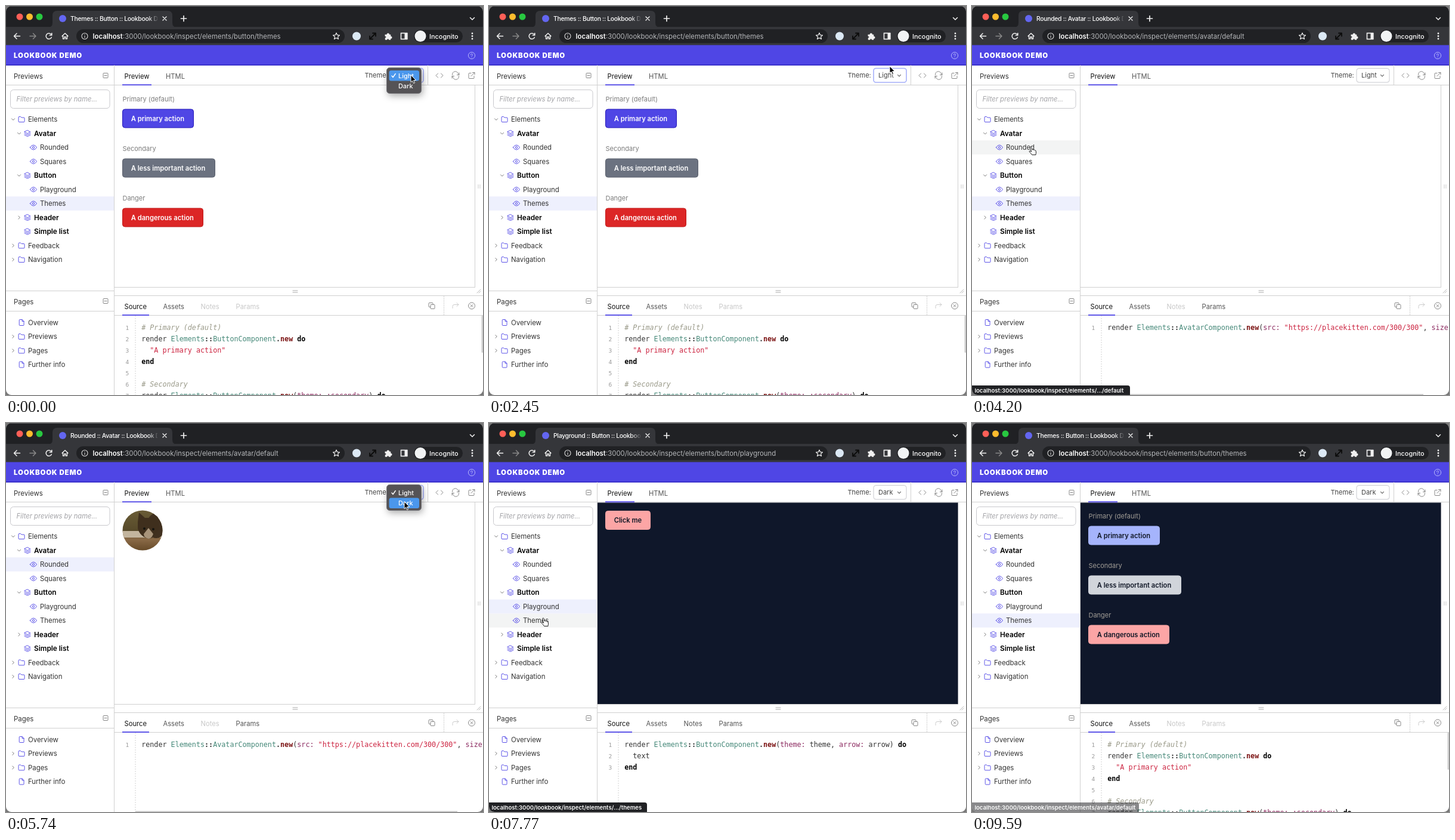
An HTML page that plays this animation: 800x652 px, repeating every 9.66 s.

```html
<!DOCTYPE html>
<html lang="en">
<head>
<meta charset="utf-8">
<title>Component preview browser</title>
<style>
html, body { margin: 0; width: 100%; height: 100%; overflow: hidden; background: #777; }
svg { display: block; width: 800px; height: 652px; }
text { font: 11.4px Inter, sans-serif; fill: #333; white-space: pre; }
.bold { font-weight: 600; font-size: 11.8px; fill: #000; }
.tab { font-size: 11.2px; fill: #555; }
.off { fill: #c8c8c8; }
.on { fill: #111; }
.small { font-size: 11px; fill: #444; }
.label { fill: #7c7c7c; font-size: 11px; }
.button { font-size: 11.2px; font-weight: 600; }
.chrome { font-weight: 500; font-size: 10.9px; fill: #fff; }
.title { font-size: 10.4px; letter-spacing: -.3px; }
.status { font-size: 9.6px; font-weight: 600; }
.code { font: 11.72px "DejaVu Sans Mono", monospace; fill: #333; }
.num { font-size: 9.5px; fill: #999; }
.comment { fill: #999988; font-style: italic; }
.string { fill: #cc2440; }
.const { fill: #458878; }
.key { fill: #8c2a60; }
.op { font-weight: bold; }
.method { fill: #7c1414; font-weight: bold; }
.word { fill: #000; font-weight: bold; }
</style>
</head>
<body>
<svg viewBox="0 0 800 652">
  <defs>
    <clipPath id="window"><rect width="800" height="652" rx="9"/></clipPath>
    <clipPath id="round"><circle cx="229" cy="180" r="33.5"/></clipPath>
    <linearGradient id="fade"><stop stop-color="#35363a" stop-opacity="0"/><stop offset="1" stop-color="#35363a"/></linearGradient>
    <linearGradient id="photo" x2="0" y2="1"><stop stop-color="#6a5c36"/><stop offset=".5" stop-color="#574a2a"/><stop offset=".72" stop-color="#8a6a47"/><stop offset="1" stop-color="#664a28"/></linearGradient>
    <filter id="shadow" x="-40%" y="-40%" width="180%" height="200%"><feDropShadow dy="4" stdDeviation="6" flood-opacity=".32"/></filter>
  </defs>
  <g clip-path="url(#window)"><g id="frame"></g><g id="page"></g><g id="status"></g><g id="cursor"></g></g>
</svg>
<script>
const INDIGO = '#4f46e5', LINE = '#d0d0d0', DARK = '#202124', LOOP = 9660;
const $ = id => document.getElementById(id);

const text = (x, y, s, cls = '', attrs = '') => `<text x="${x}" y="${y}" class="${cls}" ${attrs}>${s}</text>`;
const rect = (x, y, w, h, fill, rx = 0, stroke = 'none', width = 1) =>
  `<rect x="${x}" y="${y}" width="${w}" height="${h}" rx="${rx}" fill="${fill}" stroke="${stroke}" stroke-width="${width}"/>`;
const circle = (x, y, r, fill, stroke = 'none', width = 1) =>
  `<circle cx="${x}" cy="${y}" r="${r}" fill="${fill}" stroke="${stroke}" stroke-width="${width}"/>`;
const path = (x, y, d, stroke, width = 1, fill = 'none') =>
  `<path transform="translate(${x} ${y})" d="${d}" fill="${fill}" stroke="${stroke}" stroke-width="${width}" stroke-linecap="round" stroke-linejoin="round"/>`;
const line = (d, color = LINE, extra = '') => `<path d="${d}" fill="none" stroke="${color}" ${extra}/>`;

const ICONS = {
  folder: 'M-5 -3.5Q-5 -4.5 -4 -4.5H-1.5L0 -3H4Q5 -3 5 -2V3.5Q5 4.5 4 4.5H-4Q-5 4.5 -5 3.5Z',
  layers: 'M0 -5L5 -2.3 0 .2 -5 -2.3ZM-5 .2L0 2.7 5 .2M-5 2.6L0 5.1 5 2.6',
  eye: 'M-5.5 0Q-3 -4 0 -4T5.5 0Q3 4 0 4T-5.5 0ZM-1.7 0A1.7 1.7 0 1 0 1.7 0A1.7 1.7 0 1 0 -1.7 0',
  file: 'M-3.8 -4Q-3.8 -5 -2.8 -5H1L4 -2V4Q4 5 3 5H-2.8Q-3.8 5 -3.8 4ZM1 -5V-2H4'
};
const DOWN = 'M-2.5 -1.2L0 1.3 2.5 -1.2', RIGHT = 'M-1.2 -2.5L1.3 0 -1.2 2.5';

const treeItem = (y, x, icon, name, chevron, bold) =>
  (chevron ? path(x - 25, y, chevron, '#777') : '') +
  path(x - 11, y, ICONS[icon], '#5b52e8') + text(x, y + 4.2, name, bold ? 'bold' : '');

const TREE = [
  [37, 'folder', 'Elements', DOWN], [47, 'layers', 'Avatar', DOWN, 1],
  [57, 'eye', 'Rounded'], [57, 'eye', 'Squares'],
  [47, 'layers', 'Button', DOWN, 1], [57, 'eye', 'Playground'], [57, 'eye', 'Themes'],
  [47, 'layers', 'Header', RIGHT, 1], [47, 'layers', 'Simple list', '', 1],
  [37, 'folder', 'Feedback', RIGHT], [37, 'folder', 'Navigation', RIGHT]
];
const PAGES = [['file', 'Overview'], ['folder', 'Previews', RIGHT], ['folder', 'Pages', RIGHT], ['file', 'Further info']];
const rowY = i => 190 + i * 23.5;

const SCENES = {
  themes: {
    title: 'Themes :: Button :: Lookbook Demo', url: 'button/themes', off: ['Notes', 'Params'],
    code: ['# Primary (default)', 'render Elements::ButtonComponent.new do', '  "A primary action"', 'end', '',
      '# Secondary', 'render Elements::ButtonComponent.new(theme: :secondary) do']
  },
  avatar: {
    title: 'Rounded :: Avatar :: Lookbook Demo', url: 'avatar/default', off: ['Notes'],
    code: ['render Elements::AvatarComponent.new(src: "https://placekitten.com/300/300", size: 80)']
  },
  playground: {
    title: 'Playground :: Button :: Lookbook Demo', url: 'button/playground', off: [],
    code: ['render Elements::ButtonComponent.new(theme: theme, arrow: arrow) do', '  text', 'end']
  }
};
const BUTTONS = [
  ['Primary (default)', 'A primary action', 120, INDIGO, '#2418b8', '#a5b4fc'],
  ['Secondary', 'A less important action', 156, '#6b7280', '#5a606c', '#d1d5db'],
  ['Danger', 'A dangerous action', 136, '#dc2626', '#c01818', '#fca5a5']
];

// Each entry overrides the state from its time on.
const STATES = [
  [0, { scene: 'themes', theme: 'Light', selected: 6, hover: -1, menu: 'Light', focus: true, loaded: true }],
  [350, { menu: 'Dark' }],
  [700, { menu: '', theme: 'Dark' }],
  [1610, { menu: 'Dark' }],
  [1890, { menu: 'Light' }],
  [2240, { menu: '', theme: 'Light' }],
  [3780, { hover: 2 }],
  [4060, { focus: false }],
  [4130, { scene: 'avatar', loaded: false }],
  [4340, { selected: 2, loaded: true }],
  [4550, { hover: -1 }],
  [5320, { menu: 'Light', focus: true }],
  [5600, { menu: 'Dark' }],
  [5950, { menu: '', theme: 'Dark' }],
  [6860, { hover: 5 }],
  [7070, { focus: false }],
  [7210, { scene: 'playground', selected: 5 }],
  [7630, { hover: 6 }],
  [8050, { scene: 'themes', selected: 6 }],
  [8680, { hover: 5 }],
  [8750, { hover: 3 }],
  [8820, { hover: 2 }],
  [9240, { hover: -1 }]
];
const CURSOR = [
  [0, 679, 116], [210, 679, 116], [490, 677, 133], [700, 677, 133], [1120, 674, 130], [1400, 672, 118],
  [1680, 672, 118], [1960, 672, 99], [2450, 672, 101], [3150, 109, 379], [3360, 109, 379], [3850, 99, 236],
  [4410, 99, 236], [5180, 672, 118], [5460, 671, 118], [5670, 668, 132], [6160, 668, 132], [6930, 95, 304],
  [7420, 95, 304], [7700, 91, 327], [8400, 91, 327], [8890, 90, 236], [9030, 90, 236], [9310, -20, 236], [LOOP, -20, 236]
];

const TOKENS = ['comment', 'string', 'const', 'key', 'op', 'method', 'word'];
const highlight = source => source.replace(
  /(#.*)|("[^"]*")|([A-Z]\w+)|(\w+:(?!:)|:[a-z]\w+)|(::|\.)|(\bnew\b)|(\b(?:do|end)\b)/g,
  (match, ...groups) => `<tspan class="${TOKENS[groups.findIndex(g => typeof g === 'string')]}">${match}</tspan>`);

function frame() {
  const white = '#f1f1f1', grey = '#888';
  return rect(0, 0, 800, 652, '#fff') + rect(0, 0, 800, 36, DARK) + rect(0, 0, 800, 1, '#5c5d60') +
    `<path d="M70 36Q78 36 78 28V16Q78 8 86 8H271Q279 8 279 16V28Q279 36 287 36Z" fill="#35363a"/>` +
    rect(0, 35, 800, 31, '#35363a') +
    circle(23, 18, 5.5, '#ff5f57') + circle(39.5, 18, 5.5, '#febc2e') + circle(56, 18, 5.5, '#28c840') +
    circle(95, 21, 6, '#6366f1') +
    path(266, 21, 'M-3 -3L3 3M3 -3L-3 3', white, 1.4) + path(298, 21, 'M-4.5 0H4.5M0 -4.5V4.5', white, 1.7) +
    path(782, 21, 'M-3.5 -1.5L0 2 3.5 -1.5', white, 1.5) +
    path(18.5, 50.5, 'M5 0H-5M-.5 -4.5L-5 0 -.5 4.5', white, 1.5) +
    path(45, 50.5, 'M-5 0H5M.5 -4.5L5 0 .5 4.5', grey, 1.5) +
    path(72, 50.5, 'M4.3 2A4.8 4.8 0 1 1 3.5 -3.2M4.8 -5V-1.5H1.3', white, 1.5) +
    path(99, 50.5, 'M-5 0L0 -4.7 5 0M-3.5 -1V4.5H-1.2V1.2H1.2V4.5H3.5V-1', white, 1.4) +
    rect(118, 39, 450, 23, DARK, 11.5) +
    circle(132, 50.5, 5, 'none', '#ddd', 1.1) + path(132, 50.5, 'M0 0V2.3M0 -2.3V-2.2', '#ddd', 1.2) +
    path(554, 50.5, 'M0 -5.5L1.6 -1.8 5.5 -1.5 2.5 1.1 3.5 5 0 2.9 -3.5 5 -2.5 1.1 -5.5 -1.5 -1.6 -1.8Z', white, 1.2) +
    circle(588, 50.5, 7, '#dce9f5') +
    path(615, 50.5, 'M-5 5L5 -5M0 -5H5V0M-5 0V5H0', '#0c0c0c', 1.8) +
    path(641, 51, 'M-5 -3H-2A1.8 1.8 0 1 1 1.5 -3H4V0A1.8 1.8 0 1 1 4 3.5V5.5H1.2A1.5 1.5 0 0 0 -2 5.5H-5V2.5A1.5 1.5 0 0 0 -5 -.6Z', white, .5, white) +
    rect(662.5, 45.5, 10, 10, 'none', 0, white, 1.6) + rect(668.5, 45, 5, 11, white) +
    rect(684, 40, 82, 21, DARK, 10.5) + circle(695, 50.5, 9.5, '#f1f3f4') + text(710, 54.5, 'Incognito', 'chrome') +
    [46, 50.5, 55].map(y => circle(782, y, 1.4, white)).join('') +
    rect(0, 65.5, 800, 34, INDIGO) + rect(0, 98, 800, 1.5, '#2c21c4') +
    text(13, 87, 'LOOKBOOK DEMO', '', 'style="font-size:11.5px;font-weight:900;letter-spacing:.8px;fill:#fff"') +
    circle(781, 83, 5.6, 'none', '#b4b5fa') + path(781, 83, 'M-1.6 -1.2A1.6 1.6 0 1 1 .3 .3L0 1M0 2.7V2.8', '#b4b5fa');
}

function sidebar(s) {
  const collapse = y => rect(163, y - 4, 8, 8, 'none', 1, '#888') + path(167, y, 'M-2 0H2', '#888');
  const row = (i, fill) => i < 0 ? '' : rect(0, rowY(i) - 11.75, 181, 23.5, fill);
  return row(s.hover, '#f3f4f4') + row(s.selected, '#eef0fd') +
    text(13, 122, 'Previews') + collapse(116.5) + rect(7.5, 140.5, 166.5, 31, '#fff', 5, '#c8c8cc') +
    text(17.5, 160, 'Filter previews by name...', '', 'style="font-size:11.2px;font-style:italic;fill:#a2a2a6"') +
    TREE.map((item, i) => treeItem(rowY(i), ...item)).join('') +
    text(13, 500, 'Pages') + collapse(494.5) +
    PAGES.map((item, i) => treeItem(530.5 + i * 23.5, 37, ...item)).join('') +
    line('M0 132.5H800M0 477.5H181M0 511.5H181M181.5 99V652');
}

function photo() {
  return `<g clip-path="url(#round)">${rect(195, 146, 68, 68, 'url(#photo)')}${rect(195, 181, 68, 11, '#c3b59e')}
    <ellipse cx="252" cy="172" rx="16" ry="21" fill="#40301f"/>
    <path d="M221 166L223 150 233 159 245 159 255 151 257 172Q254 191 240 194Q225 191 221 177Z" fill="#3f2f1d"/>
    <path d="M239 176L247 186Q244 194 239 194Q231 192 231 186Z" fill="#a8947a"/>
    ${circle(232, 177, 2, '#14140f')}${circle(247, 178, 2, '#14140f')}</g>`;
}

function preview(s) {
  const dark = s.theme === 'Dark';
  const button = (y, label, w, light, border, pale) =>
    rect(195.5, y + .5, w - 1, 31, dark ? pale : light, 4, dark ? pale : border) +
    text(209.7, y + 20, label, 'button', `style="fill:${dark ? '#111827' : '#fff'}"`);
  let content = '';
  if (s.scene === 'themes') {
    content = BUTTONS.map(([label, ...rest], i) =>
      text(195.5, 160 + i * 83, label, 'label', dark ? 'style="fill:#a19d96"' : '') + button(172.5 + i * 83, ...rest)).join('');
  } else if (s.scene === 'playground') {
    content = button(147, 'Click me', 76, '#dc2626', '#c01818', '#fca5a5');
  } else if (s.loaded) content = photo();
  return line('M182 471.5H787M786.5 133V471') + (dark ? rect(182, 133.5, 604.5, 337.5, '#0f172a') : '') + content;
}

function toolbars(s) {
  const tab = (x, y, name, active) => text(x, y, name, active ? 'tab on' : SCENES[s.scene].off.includes(name) ? 'tab off' : 'tab');
  const icon = (x, y, d, color = '#888') => path(x, y, d, color);
  return tab(198.5, 122, 'Preview', true) + tab(268, 122, 'HTML') + rect(195, 131.3, 49, 1.8, INDIGO) +
    text(601.5, 120, 'Theme:', 'small') +
    rect(645, 104.5, 55, 23.5, '#fff', 4, s.focus ? '#a5affa' : '#c8c9cf', s.focus ? 1.6 : 1) +
    text(653, 120, s.theme, 'small') + path(688, 116.5, DOWN, '#666', 1.2) +
    line('M707.5 99V132M182 485.5H800M182 518.5H800') + line('M734.5 486V518', LINE, 'stroke-dasharray="2 1"') +
    icon(727, 116.5, 'M-2.5 -3.5L-6 0 -2.5 3.5M2.5 -3.5L6 0 2.5 3.5') +
    icon(754, 116.5, 'M-5.5 -1A5 5 0 0 1 4.5 -2.5L6 -1M6 -4.5V-1H2.5M5.5 1A5 5 0 0 1 -4.5 2.5L-6 1M-6 4.5V1H-2.5') +
    icon(781, 116.5, 'M-1 -4H-4Q-5 -4 -5 -3V4Q-5 5 -4 5H3Q4 5 4 4V1M1.5 -5H5V-1.5M5 -5L-1 1') +
    icon(794, 302.5, 'M-2 -3V3M1 -3V3', '#ccc') + icon(485, 478.5, 'M-4 -1.5H4M-4 1.5H4', '#aaa') +
    icon(793, 478, 'M-3 3L3 -3M0 3L3 0', '#bbb') +
    tab(198.5, 507.5, 'Source', true) + tab(263.5, 507.5, 'Assets') + tab(326.5, 507.5, 'Notes') + tab(385.5, 507.5, 'Params') +
    rect(195, 517.2, 45, 1.8, INDIGO) +
    icon(714, 502.5, 'M-1 -2H4Q5 -2 5 -1V4Q5 5 4 5H-1Q-2 5 -2 4V-1Q-2 -2 -1 -2ZM-2 2H-4Q-5 2 -5 1V-4Q-5 -5 -4 -5H1Q2 -5 2 -4V-2') +
    icon(754, 502.5, 'M-5 4V1Q-5 -2 -2 -2H5M2 -5L5 -2 2 1', '#ccc') +
    icon(781, 502.5, 'M-5.5 0A5.5 5.5 0 1 0 5.5 0A5.5 5.5 0 1 0 -5.5 0M-2 -2L2 2M2 -2L-2 2');
}

function source(s) {
  return line('M217 519V652', LINE, 'stroke-dasharray="2 2"') +
    SCENES[s.scene].code.map((row, i) => {
      const y = 542.7 + i * 19.1;
      return text(200.5, y, i + 1, 'code num') + text(227.2, y, highlight(row), 'code');
    }).join('') +
    (s.scene === 'themes' ? rect(797.5, 519, 3, 62, '#cfcfcf', 1) : '') +
    (s.scene === 'avatar' ? rect(217, 650.5, 540, 2, '#c4c4c4') : '');
}

function menu(s) {
  if (!s.menu) return '';
  const top = s.theme === 'Dark' ? 85 : 103;
  const item = (name, y) =>
    (s.menu === name ? rect(642.5, y - 8.5, 50.5, 17.5, '#4b97ec', 3.5) : '') +
    (s.theme === name ? path(650, y, 'M-3 .5L-1 3 3.2 -3', '#fff', 1.4) : '') +
    text(658, y + 4, name, 'chrome');
  return `<g filter="url(#shadow)">${rect(638.5, top + .5, 58, 43, '#545357', 5, '#77767a')}</g>` + item('Light', top + 13.5) + item('Dark', top + 31);
}

function page(s) {
  const { title, url } = SCENES[s.scene];
  return text(108, 25, title.slice(0, 31), 'chrome title') +
    rect(238, 12, 18, 20, 'url(#fade)') + rect(254, 12, 7, 20, '#35363a') +
    text(145.5, 54.5, `<tspan fill="#fff" font-weight="600">localhost</tspan>:3000/lookbook/inspect/elements/${url}`, '', 'style="font-size:11.4px;fill:#b5b7ba"') +
    sidebar(s) + preview(s) + toolbars(s) + source(s) + menu(s);
}

function statusBar(t) {
  const spans = [[3990, 4620, '.../default'], [7000, 7650, '.../playground'], [7700, 8750, '.../themes'], [8890, LOOP, 'avatar/default']];
  const span = spans.find(([from, to]) => t >= from && t < to);
  if (!span) return '';
  const opacity = t > 9450 ? 1 - (t - 9450) / 300 : 1;
  return `<g opacity="${opacity}">${rect(-5, 636, span[2].startsWith('.') ? 270 : 285, 22, DARK, 4)}
    ${text(4.5, 648, 'localhost:3000/lookbook/inspect/elements/' + span[2], 'chrome status')}</g>`;
}

function cursor(t) {
  const i = CURSOR.findIndex(key => key[0] > t), [t0, x0, y0] = CURSOR[i - 1], [t1, x1, y1] = CURSOR[i];
  const p = (t - t0) / (t1 - t0), ease = p * p * (3 - 2 * p);
  const x = x0 + (x1 - x0) * ease, y = y0 + (y1 - y0) * ease;
  return x < 165 && y > 180
    ? path(x, y, 'M-1.3 1Q-1 -.5 .3 0Q1 .3 1.2 1.5L2 5Q3.5 4 4.2 5.2Q5.7 4.5 6.3 5.8Q8 5.5 8.2 7.2L8.5 10Q8 11.5 8 13.5H1.5Q0 10.5 -2.7 8.6Q-3.5 7 -2 6.8L.3 8Z', '#222', 1, '#fff')
    : path(x, y, 'M0 0V11.7L2.7 9.2 4.6 13.6 6.5 12.8 4.6 8.5H8.3Z', '#fff', 1, '#000');
}

let shown;
function draw() {
  const t = performance.now() % LOOP;
  const past = STATES.filter(([from]) => from <= t);
  if (past.length !== shown) {
    shown = past.length;
    $('page').innerHTML = page(Object.assign({}, ...past.map(entry => entry[1])));
  }
  $('status').innerHTML = statusBar(t);
  $('cursor').innerHTML = cursor(t);
  requestAnimationFrame(draw);
}
$('frame').innerHTML = frame();
draw();
</script>
</body>
</html>
```
